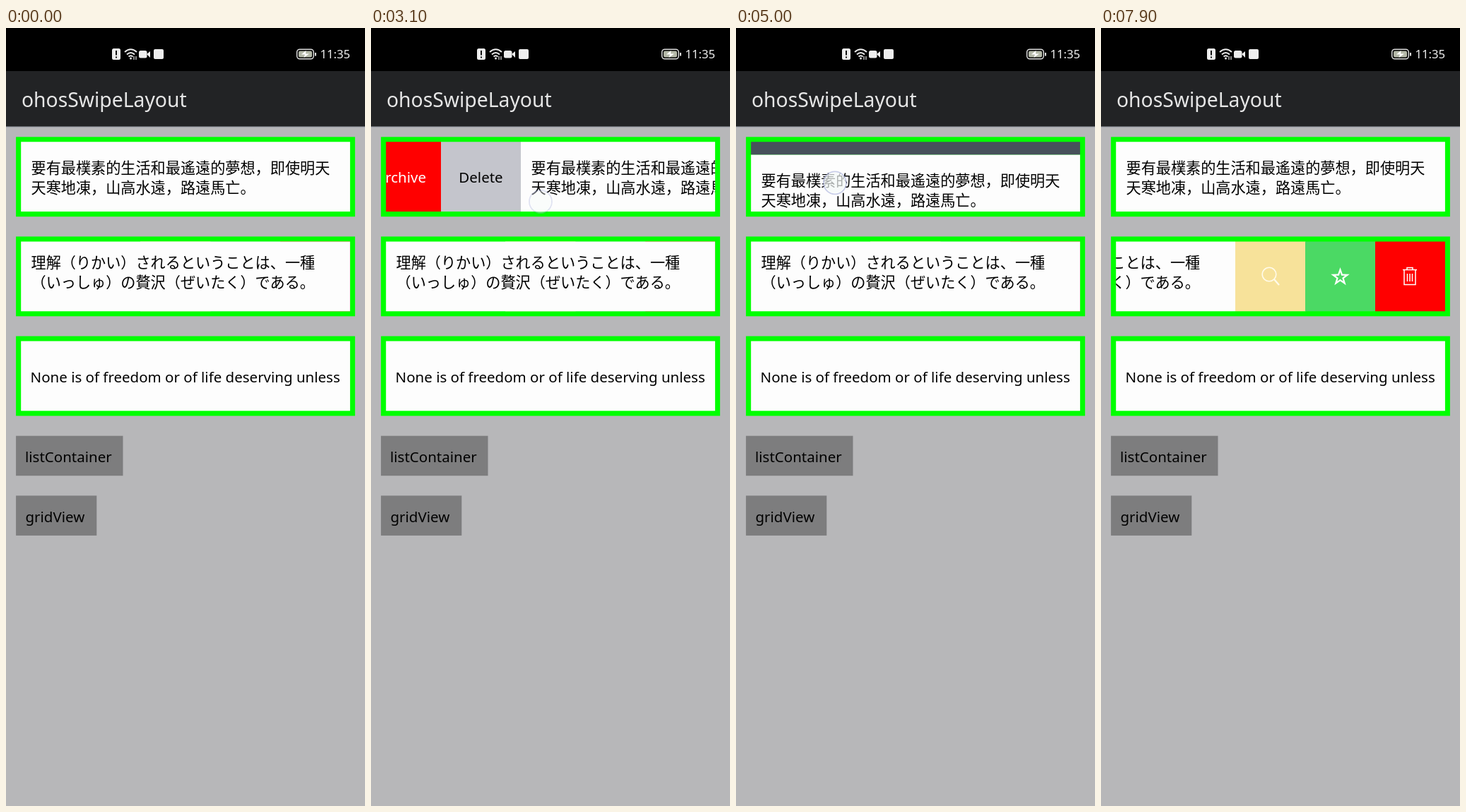
Animation of 508x1102 px, one loop 8000 ms. Source, as an HTML page:

```html
<!DOCTYPE html>
<html lang="en">
<head>
<meta charset="utf-8">
<title>Swipe layout</title>
<style>
  html, body { margin: 0; width: 100%; height: 100%; overflow: hidden; background: #b7b7b9; }
  svg { display: block; width: 100vw; height: 100vh; }
  text { font: 20.5px "Noto Sans", sans-serif; }
  .zh { font: 21.15px "Noto Sans CJK SC", "Noto Sans CJK", sans-serif; }
  .ja { font: 21.15px "Noto Sans CJK JP", "Noto Sans CJK", sans-serif; }
  .mid { text-anchor: middle; }
</style>
</head>
<body>
<svg viewBox="0 0 508 1102">
  <defs>
    <clipPath id="clip1"><rect x="21.2" y="161.3" width="465.7" height="98.8"/></clipPath>
    <clipPath id="clip2"><rect x="21.2" y="302.4" width="465.7" height="98.8"/></clipPath>
    <path id="star" fill-rule="evenodd"/>
    <g id="tools">
      <rect width="99.5" height="100" fill="#f7e29a"/>
      <rect x="99" width="99.5" height="100" fill="#4bd964"/>
      <rect x="198" width="99" height="100" fill="#f00"/>
      <g fill="none" stroke="#fffbea" stroke-width="1.6">
        <circle cx="48" cy="47" r="9.8"/>
        <path d="M55 54 62 62" stroke-width="2.2"/>
      </g>
      <use href="#star" transform="translate(148.5 51) scale(.68)" fill="#fff"/>
      <path d="M237 40.5H257M243 40V37.5H251V40M239 41V61.5H255V41M243.5 46V57M247 46V57M250.5 46V57"
            fill="none" stroke="#fff" stroke-width="1.5"/>
    </g>
  </defs>

  <rect width="508" height="1102" fill="#b7b7b9"/>
  <rect y="139" width="508" height="2" fill="#a3a7ae"/>
  <rect y="60" width="508" height="79.5" fill="#222325"/>
  <rect width="508" height="61" fill="#000"/>

  <!-- status bar -->
  <rect x="150" y="29" width="12" height="16" rx="2.5" fill="#eee"/>
  <path d="M156 32V38.5M156 40.5V42.5" stroke="#111" stroke-width="2"/>
  <path d="M168 34Q176.500 26.500 185 34M171 37.500Q176.500 32.500 182 37.500M173.500 40.500Q176.500 38 179.500 40.500"
        fill="none" stroke="#eee" stroke-width="2"/>
  <circle cx="176.5" cy="43" r="1.5" fill="#eee"/>
  <path d="M181 40V45M184 45V40" stroke="#ccc" stroke-width="1.3"/>
  <rect x="188" y="32" width="11.5" height="10.5" rx="2.5" fill="#eee"/>
  <path d="M199 37 204 33V42Z" fill="#eee"/>
  <rect x="209" y="30" width="14" height="14" rx="2" fill="#eee"/>
  <rect x="411.7" y="30.2" width="23.6" height="13.6" rx="4" fill="none" stroke="#ddd" stroke-width="1.5"/>
  <rect x="414" y="32.5" width="19" height="9" rx="2" fill="#b4b8a8"/>
  <path d="M424.5 32 418 37.5H423L421.5 42 429 36.5H424Z" fill="#fff"/>
  <path d="M438 35V39.5" stroke="#ddd" stroke-width="2"/>
  <text x="444.5" y="43" fill="#eee" style="font-size:16.7px">11:35</text>

  <text x="22" y="112" fill="#e6e6e6" style="font-size:28.3px">ohosSwipeLayout</text>

  <!-- cards -->
  <g fill="#0f0">
    <rect x="14.1" y="154.3" width="479.8" height="112.9"/>
    <rect x="14.1" y="295.4" width="479.8" height="112.9"/>
    <rect x="14.1" y="436.5" width="479.8" height="112.9"/>
  </g>

  <g clip-path="url(#clip1)">
    <g id="card1">
      <rect x="21" y="161" width="466" height="99.2" fill="#fdfdfd"/>
      <text class="zh" x="35.5" y="205.5">要有最樸素的生活和最遙遠的夢想&#xFF0C;即使明天</text>
      <text class="zh" x="35.5" y="233.8">天寒地凍&#xFF0C;山高水遠&#xFF0C;路遠馬亡。</text>
      <rect x="-205" y="161" width="113" height="100" fill="#f00"/>
      <rect x="-92" y="161" width="113" height="100" fill="#c4c5cc"/>
      <text class="mid" x="-148.5" y="219" fill="#fff">Archive</text>
      <text class="mid" x="-35.5" y="219">Delete</text>
      <use href="#tools" x="487" y="161"/>
      <rect x="21" y="48" width="466" height="113" fill="#47515b"/>
      <rect x="21" y="260" width="466" height="100" fill="#47515b"/>
      <use href="#star" transform="translate(254 105.5) scale(.94)" fill="#f4fbfb"/>
      <use href="#star" transform="translate(254 308.5) scale(1.02)" fill="#f4fbfb"/>
    </g>
  </g>

  <g clip-path="url(#clip2)">
    <use href="#tools" x="190" y="302"/>
    <g id="card2">
      <rect x="21" y="302" width="466" height="100" fill="#fdfdfd"/>
      <text class="ja" x="35.5" y="340">理解&#xFF08;りかい&#xFF09;されるということは、一種</text>
      <text class="ja" x="35.5" y="368.3">&#xFF08;いっしゅ&#xFF09;の贅沢&#xFF08;ぜいたく&#xFF09;である。</text>
    </g>
  </g>

  <rect x="21.2" y="443.5" width="465.7" height="98.8" fill="#fdfdfd"/>
  <text x="34.6" y="502">None is of freedom or of life deserving unless</text>

  <rect x="14.1" y="577.7" width="151.4" height="56.5" fill="#7d7d7e"/>
  <text x="27" y="615">listContainer</text>
  <rect x="14.1" y="662.4" width="114.2" height="56.5" fill="#7d7d7e"/>
  <text x="27.5" y="700">gridView</text>

  <g id="finger">
    <circle r="16" fill="#f4faf8" fill-opacity=".7" stroke="#a9b0dc" stroke-opacity=".6" stroke-width="1.8"/>
    <circle r="14.5" fill="none" stroke="#fff" stroke-opacity=".6"/>
  </g>
</svg>

<script>
const LOOP = 8000, STEP = 100, SETTLE = 350, FADE = 230;
const $ = id => document.getElementById(id);
const clamp = (v, lo, hi) => Math.min(hi, Math.max(lo, v));
const lerp = (a, b, u) => a + (b - a) * u;
const smooth = u => u * u * (3 - 2 * u);
const swipe = (card, axis, down, up, from, to, home, target) =>
  ({ card, axis, down, up, from, to, home, target });

// The surface follows the finger, then settles on its target after release.
const swipes = [
  swipe('card1', 0, 1400, 1700, [400, 215], [180, 230], 0, -297),
  swipe('card1', 0, 2050, 2300, [60, 256], [192, 262], -297, 0),
  swipe('card1', 0, 2700, 3000, [110, 236], [240, 246], 0, 226),
  swipe('card1', 0, 3500, 3850, [239, 247], [112, 250], 226, 0),
  swipe('card1', 1, 4200, 4500, [137, 213], [137, 322], 0, 99),
  swipe('card1', 1, 4800, 5050, [140, 300], [140, 210], 99, 0),
  swipe('card1', 1, 5350, 5650, [54, 233], [54, 150], 0, -99),
  swipe('card1', 1, 6000, 6300, [60, 190], [60, 265], -99, 0),
  swipe('card2', 0, 6800, 6900, [278, 376], [278, 376], 0, 0),
  swipe('card2', 0, 6900, 7050, [278, 376], [120, 372], 0, -297)
];

function starPath(r) {
  let d = '';
  for (let i = 0; i < 10; i++) {
    const a = i * Math.PI / 5, q = i % 2 ? r * 0.4 : r;
    d += (i ? 'L' : 'M') + (q * Math.sin(a)).toFixed(2) + ' ' + (-q * Math.cos(a)).toFixed(2);
  }
  return d + 'Z';
}

function fingerAt(s, t) {
  const u = smooth(clamp((t - s.down) / (s.up - s.down), 0, 1));
  return [lerp(s.from[0], s.to[0], u), lerp(s.from[1], s.to[1], u)];
}

function offsetAt(s, t) {
  const drag = s.home + fingerAt(s, t)[s.axis] - s.from[s.axis];
  const held = clamp(drag, Math.min(s.home, s.target), Math.max(s.home, s.target));
  const left = 1 - clamp((t - s.up) / SETTLE, 0, 1);
  return t < s.up ? held : lerp(s.target, held, left ** 3);
}

function move(node, x, y) {
  node.setAttribute('transform', `translate(${x.toFixed(2)} ${y.toFixed(2)})`);
}

function render(t) {
  const past = swipes.filter(s => s.down <= t);
  for (const id of ['card1', 'card2']) {
    const s = past.filter(p => p.card === id).pop();
    const off = [0, 0];
    if (s) off[s.axis] = offsetAt(s, t);
    move($(id), ...off);
  }
  const last = past.pop();
  const alpha = last ? 1 - clamp((t - last.up) / FADE, 0, 1) : 0;
  $('finger').setAttribute('opacity', alpha);
  if (last) move($('finger'), ...fingerAt(last, t));
}

$('star').setAttribute('d', starPath(20.5) + starPath(10.5));
const start = performance.now();
function tick() {
  const t = (performance.now() - start) % LOOP;
  render(Math.floor(t / STEP) * STEP);
  requestAnimationFrame(tick);
}
tick();
</script>
</body>
</html>
```
